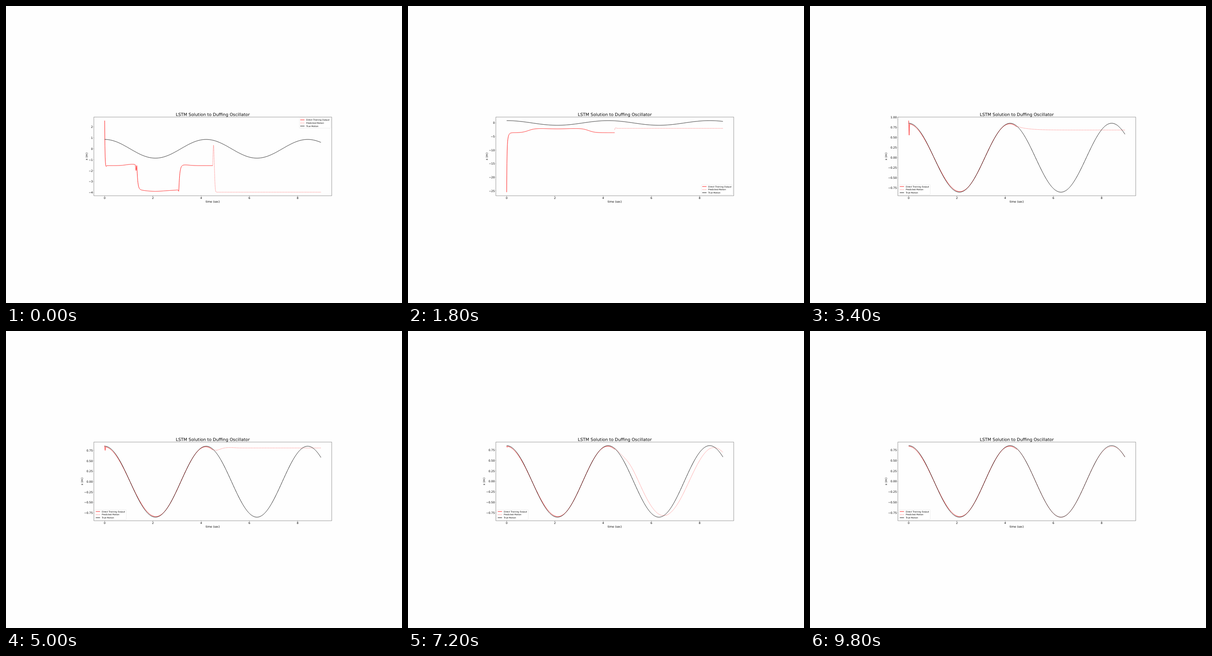
These frames come from a looping animation (864 by 648 pixels, 10000 ms). An HTML page:

```html
<!DOCTYPE html>
<html lang="en">
<head>
<meta charset="utf-8">
<title>Oscillator fit</title>
<style>
  html, body { margin: 0; width: 100%; height: 100%; overflow: hidden; background: #fefefe; }
  svg { display: block; width: 864px; height: 648px; }
  text { font: 6.2px "DejaVu Sans", sans-serif; text-rendering: geometricPrecision; }
  .mid { text-anchor: middle; }
  .end { text-anchor: end; }
  text.title { font-size: 9.29px; }
  .legend text { font-size: 4.6px; }
  path { fill: none; stroke-linejoin: round; }
  .axis { stroke: #000; stroke-width: .4; }
  .direct { stroke: #f00; stroke-width: .88; }
  .predicted { stroke: #f00; stroke-width: .45; stroke-dasharray: 1.7 .7; }
  .true { stroke: #000; stroke-width: .88; }
</style>
</head>
<body>
<svg viewBox="0 0 864 648">
  <text class="title mid" x="451.2" y="240.3">LSTM Solution to Duffing Oscillator</text>
  <text class="mid" x="451.2" y="428.8">time (sec)</text>
  <text class="mid" id="yLabel">x (m)</text>
  <g id="xTicks"></g>
  <g id="yTicks"></g>
  <path class="direct" id="direct"/>
  <path class="predicted" id="predicted"/>
  <path class="true" id="true"/>
  <path class="axis" d="M191.7 242.3H710.7V414H191.7Z"/>
  <g class="legend" id="legend">
    <rect width="68.3" height="22" rx=".9" fill="#fff" fill-opacity=".8" stroke="#ccc" stroke-width=".31"/>
  </g>
</svg>
<script>
const STEP = 200, LOOP = 10000;
const LEFT = 191.7, TOP = 242.3, BOTTOM = 414;
const SPLIT = 4.48, END = 8.97, DT = 0.01;

const $ = id => document.getElementById(id);
const px = t => 215.3 + 52.6 * t;

// Building blocks of the curves: a bell, a smooth step, a decay and a sudden approach to 1.
const bump = (t, center, width) => Math.exp(-(((t - center) / width) ** 2));
const rise = (t, center, width) => 1 / (1 + Math.exp((center - t) / width));
const decay = (t, tau) => Math.exp(-t / tau);
const settle = (t, start, tau) => t < start ? 0 : 1 - decay(t - start, tau);

const omega = 2 * Math.PI / 4.21;
const motion = t => 0.855 * Math.cos(omega * t);

// A close fit that starts with a short kick up and down.
const fit = (up, down) => t =>
  0.84 * Math.cos(omega * t) - 0.01 * Math.sin(2 * omega * t)
  + up * bump(t, 0, .005) - down * bump(t, .02, .01);

const stages = [
  { at: 0,
    direct: t => -1.54 + 4.115 * decay(t, .012) - .1 * bump(t, .06, .02)
      + .13 * bump(t, 1.15, .35) - .55 * bump(t, 1.3, .022)
      - 2.25 * settle(t, 1.335, .035) - .1 * bump(t, 2.1, .5)
      - .13 * bump(t, 3.07, .02) + 2.25 * settle(t, 3.075, .04) + .07 * bump(t, 3.3, .3),
    predicted: t => -3.967 + 4.337 * bump(t, 4.515, .046) },
  { at: 1800,
    direct: t => -3.6 - 14 * decay(t, .01) - 7.9 * decay(t, .04)
      + 1.6 * (rise(t, .9, .13) - rise(t, 3.4, .13)) - .18 * bump(t, 2.1, .6),
    predicted: t => -2 - .6 * decay(t - SPLIT, .01) + .2 * bump(t, 4.52, .04) },
  { at: 2400,
    direct: fit(.15, .45),
    predicted: t => .63 + .15 * decay(t - SPLIT, .45) },
  { at: 3400,
    direct: fit(.085, .28),
    predicted: t => .686 + .095 * decay(t - SPLIT, .45) },
  { at: 5000,
    direct: fit(.03, .085),
    predicted: t => .812 - .055 * bump(t, 4.62, .22) + .01 * bump(t, 5.2, .25) },
  { at: 6200,
    direct: fit(.01, .045),
    predicted: t => motion(t - .39 * rise(t, 4.9, .13)) - .03 * bump(t, 8.8, .3) },
  { at: 8200,
    direct: fit(0, 0),
    predicted: t => motion(t - .045 * bump(t, 5.15, .5) - .012 * bump(t, 7.3, .5)) },
  { at: 9800,
    direct: fit(0, 0),
    predicted: t => motion(t) - .022 * bump(t, 8.35, .35) }
];

function sample(f, from, to) {
  const n = Math.round((to - from) / DT);
  return Array.from({ length: n + 1 }, (_, i) => [from + i * DT, f(from + i * DT)]);
}

function tickStep(range) {
  const raw = range / 9, unit = 10 ** Math.floor(Math.log10(raw));
  return unit * [1, 2, 2.5, 5, 10].find(m => m * unit >= raw);
}

const label = (x, y, cls, str) => `<text class="${cls}" x="${x}" y="${y}">${str}</text>`;

// Takes the first corner that the curves cross least.
function placeLegend(points) {
  const right = 640.1, left = 194, high = 244.5, low = 389.9;
  const corners = [[right, high], [left, high], [left, low], [right, low]];
  const hits = corners.map(([x, y]) =>
    points.filter(p => p[0] > x && p[0] < x + 68.3 && p[1] > y && p[1] < y + 22).length);
  const best = hits.indexOf(Math.min(...hits));
  $("legend").setAttribute("transform", `translate(${corners[best]})`);
}

function drawTicks(low, high, py) {
  const step = tickStep(high - low);
  const decimals = [0, 1].find(d => Math.abs(step - step.toFixed(d)) < 1e-6) ?? 2;
  let ticks = "";
  for (let n = Math.ceil(low / step); n * step <= high; n++) {
    const y = py(n * step);
    const str = (n * step).toFixed(decimals).replace("-", "−");
    ticks += label(189.5, y + 2.3, "end", str) + `<path class="axis" d="M${LEFT - 1.1} ${y}H${LEFT}"/>`;
  }
  $("yTicks").innerHTML = ticks;
  const x = $("yTicks").getBBox().x - 2.6;
  $("yLabel").setAttribute("transform", `translate(${x} 328.2) rotate(-90)`);
}

function draw(time) {
  const next = Math.max(1, stages.findIndex(s => s.at >= time));
  const a = stages[next - 1], b = stages[next];
  const k = (time - a.at) / (b.at - a.at);
  const blend = name => t => a[name](t) * (1 - k) + b[name](t) * k;
  const lines = {
    direct: sample(blend("direct"), 0, SPLIT),
    predicted: sample(blend("predicted"), SPLIT, END),
    true: sample(motion, 0, END)
  };

  const values = Object.values(lines).flat().map(p => p[1]);
  const max = Math.max(...values), min = Math.min(...values), pad = (max - min) * .05;
  const low = min - pad, high = max + pad;
  const py = v => TOP + (high - v) / (high - low) * (BOTTOM - TOP);

  const points = [];
  for (const [name, line] of Object.entries(lines)) {
    const path = line.map(([t, v]) => [px(t), py(v)]);
    points.push(...path);
    $(name).setAttribute("d", "M" + path.map(p => p.map(c => c.toFixed(2)).join(" ")).join("L"));
  }
  drawTicks(low, high, py);
  placeLegend(points);
}

$("xTicks").innerHTML = [0, 2, 4, 6, 8].map(t =>
  label(px(t), 421.4, "mid", t) + `<path class="axis" d="M${px(t)} ${BOTTOM}v1.1"/>`).join("");

const names = { direct: "Direct Training Output", predicted: "Predicted Motion", true: "True Motion" };
$("legend").innerHTML += Object.entries(names).map(([cls, str], i) => {
  const y = 4 + 6.75 * i;
  return `<path class="${cls}" d="M1.9 ${y}h9.3"/>` + label(14.9, y + 1.7, "", str);
}).join("");

let shown = 0;
function tick(now) {
  const time = Math.floor(now % LOOP / STEP) * STEP;
  if (time !== shown) draw(shown = time);
  requestAnimationFrame(tick);
}
draw(shown);
requestAnimationFrame(tick);
</script>
</body>
</html>
```
